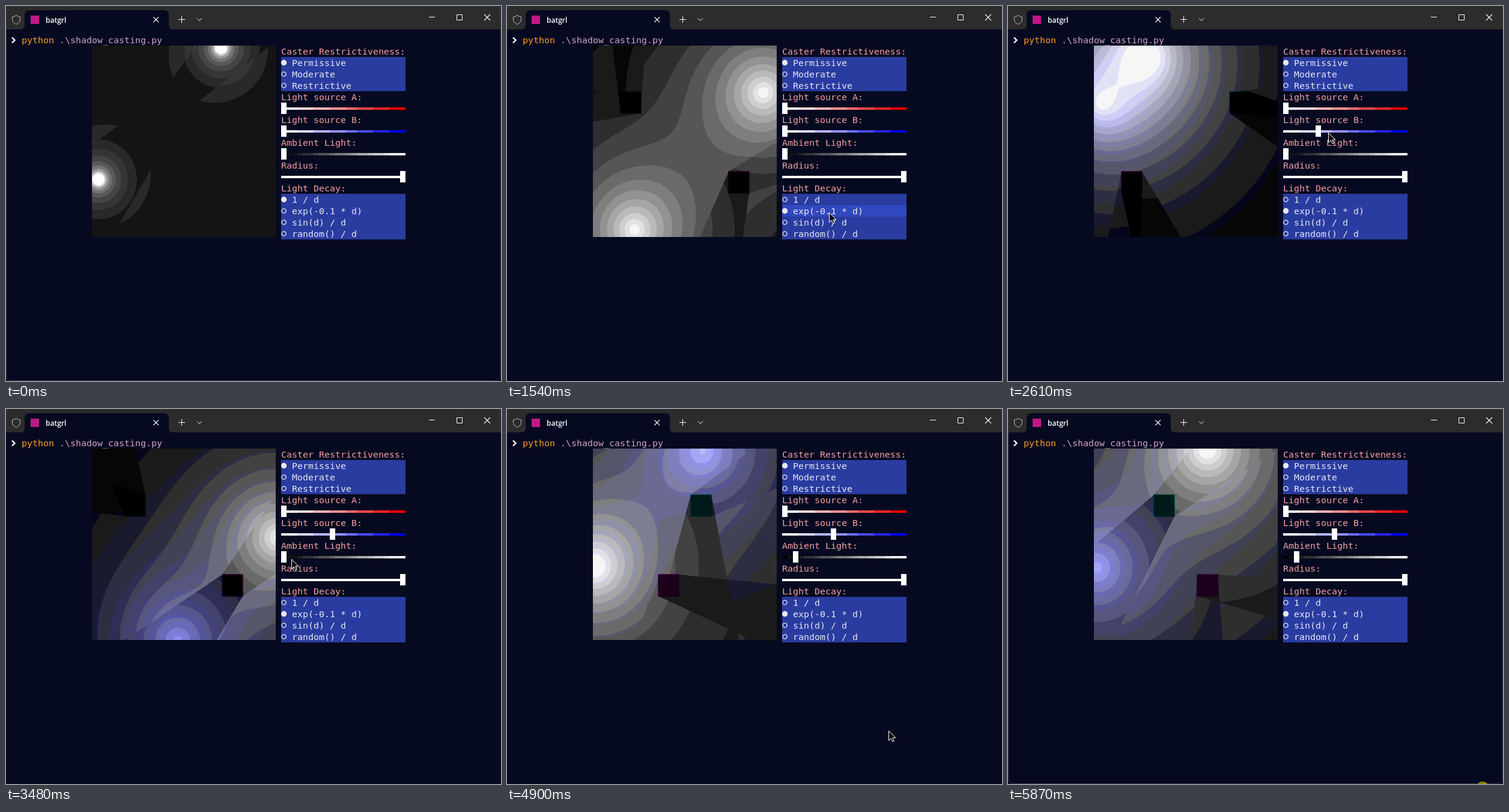
An HTML page with a canvas for the animation above (5.92 s loop, 824 by 625 pixels).

```html
<!DOCTYPE html>
<html lang="en">
<head>
<meta charset="utf-8">
<title>Shadow casting</title>
<style>
  html, body { margin: 0; width: 824px; height: 625px; overflow: hidden; background: #060a20; }
  canvas, svg { position: absolute; display: block; }
  canvas { left: 143px; top: 66px; }
  svg { left: 0; top: 0; }
  .mono { font: 14.95px "DejaVu Sans Mono", "Liberation Mono", monospace; }
  .tab { font: 600 12px "Open Sans", "Noto Sans", sans-serif; }
</style>
</head>
<body>
<canvas id="map" width="306" height="319"></canvas>
<svg id="ui" width="824" height="625" viewBox="0 0 824 625"></svg>
<script>
const LOOP = 5920, W = 306, H = 319, LEFT = 143, TOP = 66;
const CELL = 9, ROW = 19, PANEL = 458, CELLS = 23;
const BG = "#060a20", LABEL = "#f2a1a1", MENU = "#2a3ca0", HOVER = "#3248c0", ITEM = "#e6e8f2";
const ui = document.getElementById("ui");
const ctx = document.getElementById("map").getContext("2d");
const image = ctx.createImageData(W, H);

// ---------- time ----------
// Start of each run of twelve 50 ms steps; 1 marks a run whose first step lasts 70 ms.
const RUNS = [[0, 0], [50, 0], [670, 0], [1270, 1], [1890, 0], [2490, 1], [3110, 1],
              [3730, 1], [4350, 0], [4950, 1], [5570, 0]];

function snap(t) {
  const [start, long] = RUNS.filter(r => r[0] <= t).pop();
  const d = t - start, extra = long * 20;
  if (d < 50 + extra) return start;
  return start + extra + Math.min(11, Math.floor((d - extra) / 50)) * 50;
}

// Linear interpolation through rows of [time, ...values].
function track(rows, t) {
  if (t <= rows[0][0]) return rows[0].slice(1);
  for (let i = 1; i < rows.length; i++) {
    const a = rows[i - 1], b = rows[i];
    if (t < b[0]) {
      const k = (t - a[0]) / (b[0] - a[0]);
      return a.slice(1).map((v, j) => v + (b[j + 1] - v) * k);
    }
  }
  return rows[rows.length - 1].slice(1);
}

// ---------- scene ----------
// time, box travel in cells, light A x y, light B x y
const POSES = [
  [0, 8, 358, 70, 154, 289],
  [1540, 40, 212, 373, 427, 144],
  [2610, 60, 229, 82, 156, 163],
  [3480, 79, 452, 214, 286, 386],
  [4350, 96, 271, 384, 444, 203],
  [4900, 107, 145, 262, 326, 69],
  [5870, 126, 332, 68, 147, 264],
];

// The lights orbit in opposite directions, so interpolate unwrapped polar coordinates.
const TAU = Math.PI * 2, mod = (a, n) => ((a % n) + n) % n;
function polar(x, y) {
  const u = (x - LEFT) / W * 2 - 1, v = (y - TOP) / H * 2 - 1;
  return [Math.atan2(v, u), Math.hypot(u, v)];
}
function point(angle, r) {
  return [(1 + r * Math.cos(angle)) * W / 2, (1 + r * Math.sin(angle)) * H / 2];
}
const orbit = [];
for (const [t, travel, ax, ay, bx, by] of POSES) {
  const a = polar(ax, ay), b = polar(bx, by), last = orbit[orbit.length - 1];
  if (last) {
    a[0] = last[2] + mod(a[0] - last[2], TAU);
    b[0] = last[4] - mod(last[4] - b[0], TAU);
  }
  orbit.push([t, travel, ...a, ...b]);
}

function bounce(travel) {
  const p = mod(Math.round(travel), 40);
  return 5 + (p < 20 ? p : 40 - p);
}

const BOX_W = 36, BOX_H = 38;
function blocked(px, py, dx, dy, box) {
  const x1 = (box.x + 1 - px) / dx, x2 = (box.x + BOX_W - 1 - px) / dx;
  const y1 = (box.y + 1 - py) / dy, y2 = (box.y + BOX_H - 1 - py) / dy;
  const enter = Math.max(Math.min(x1, x2), Math.min(y1, y2), 0);
  const leave = Math.min(Math.max(x1, x2), Math.max(y1, y2), 1);
  return enter < leave;
}

const inverse = d => Math.min(1, 1 / d);
const exponential = d => Math.exp(-0.1 * d);

// Banding: geometric for 1 / d, even steps for exp.
function coarse(v) {
  if (v < 36) return 20;
  const n = Math.min(7, Math.floor(Math.log(v / 36) / Math.log(1.3)));
  return Math.min(255, 40.7 * 1.3 ** n);
}
const even = v => v < 1 ? 0 : Math.min(246, Math.floor(v / 20) * 20 + 6);
const table = f => Uint8ClampedArray.from({ length: 256 }, (_, v) => f(v));
const BANDS = { inverse: table(coarse), exponential: table(even) };

function drawMap(t, tint, ambient) {
  const [travel, a, ra, b, rb] = track(orbit, t);
  const col = bounce(travel);
  const boxes = [
    { x: col * CELL, y: 76, color: [0, 1, 1] },
    { x: (30 - col) * CELL, y: 209, color: [1, 0, 1] },
  ];
  const lights = [
    { at: point(a, ra), color: [1, 1, 1] },
    { at: point(b, rb), color: [1 - tint, 1 - tint, 1] },
  ];
  const early = t < EXP_AT;
  const decay = early ? inverse : exponential;
  const bands = early ? BANDS.inverse : BANDS.exponential;
  const white = [1, 1, 1], data = image.data, sum = [0, 0, 0];
  let k = 0;
  for (let y = 0; y < H; y++) for (let x = 0; x < W; x++) {
    const px = x + 0.5, py = y + 0.5;
    sum.fill(ambient);
    for (const { at, color } of lights) {
      const dx = at[0] - px, dy = at[1] - py;
      if (blocked(px, py, dx, dy, boxes[0]) || blocked(px, py, dx, dy, boxes[1])) continue;
      const power = decay(Math.hypot(dx / 9, dy / 9.38));
      for (let c = 0; c < 3; c++) sum[c] += power * color[c];
    }
    const box = boxes.find(o => px > o.x && px < o.x + BOX_W && py > o.y && py < o.y + BOX_H);
    const base = box ? box.color : white;
    for (let c = 0; c < 3; c++) data[k++] = bands[Math.min(255, Math.floor(255 * sum[c] * base[c]))];
    data[k++] = 255;
  }
  ctx.putImageData(image, 0, 0);
}

// ---------- interface ----------
function add(tag, attrs, text) {
  const el = document.createElementNS("http://www.w3.org/2000/svg", tag);
  for (const name in attrs) el.setAttribute(name, attrs[name]);
  if (text) el.textContent = text;
  return ui.appendChild(el);
}
const rect = (x, y, width, height, fill) => add("rect", { x, y, width, height, fill });
const line = (d, stroke = "#fff", width = 1) =>
  add("path", { d, stroke, fill: "none", "stroke-width": width });
const rowY = row => TOP + row * ROW;
const write = (text, x, row, fill) => add("text", { x, y: rowY(row) + 15, fill, class: "mono" }, text);

function titleBar() {
  rect(0, 0, 824, 39, "#2c2c2c");
  add("path", { d: "M24 39Q31 39 31 32V15Q31 7 39 7H263Q271 7 271 15V32Q271 39 278 39Z", fill: BG });
  line("M17 15.5Q20 18 23.5 18V22Q23.5 28 17 30.5Q10.500 28 10.500 22V18Q14 18 17 15.500Z", "#b8b8b8");
  rect(41, 16, 14, 14, "#c01888");
  add("text", { x: 66, y: 28, fill: "#fff", class: "tab" }, "batgrl");
  line("M245.500 18.500L254 27M254 18.500L245.500 27", "#fff", 1.1);
  line("M287 22.500H298M292.500 17V28");
  line("M309.500 13V32", "#333");
  line("M318 20.500L322 24.500L326 20.500");
  line("M704 18.500H714");
  line("M750.500 14.500H759.500V23.500H750.500Z");
  line("M796 14L806 24M806 14L796 24", "#fff", 1.1);
}

function prompt() {
  line("M10 52.500L14.500 57L10 61.500", "#fff", 2.4);
  write("python", 26, -1, "#ff9a28");
  write(".\\shadow_casting.py", 89, -1, "#d2a3c6");
}

function radios(row, names) {
  return names.map((name, i) => {
    const y = rowY(row + i);
    const back = rect(PANEL, y, CELLS * CELL, ROW, MENU);
    const dot = add("circle", { cx: 462.5, cy: y + 9.5, stroke: ITEM, "stroke-width": 1.4 });
    write(name, 476, row + i, ITEM);
    return { y, back, dot };
  });
}

function setRadios(list, chosen, [mx, my]) {
  list.forEach(({ y, back, dot }, i) => {
    const over = mx >= PANEL && mx < 665 && my >= y && my < y + ROW;
    back.setAttribute("fill", over ? HOVER : MENU);
    dot.setAttribute("fill", i === chosen ? ITEM : "none");
    dot.setAttribute("r", i === chosen ? 4 : 3.6);
  });
}

function slider(row, steps, shade, start = 0) {
  const y = rowY(row);
  for (let i = 0; i < steps; i++) {
    const x = Math.round(i * CELLS / steps), end = Math.round((i + 1) * CELLS / steps);
    rect(PANEL + x * CELL, y + 8, (end - x) * CELL, 4, shade(steps > 1 ? i / (steps - 1) : 0));
  }
  return rect(PANEL + start * CELL, y, CELL, ROW, "#fff");
}

const fade = k => Math.round(255 * (1 - k));
titleBar();
prompt();
write("Caster Restrictiveness:", PANEL, 0, LABEL);
const casters = radios(1, ["Permissive", "Moderate", "Restrictive"]);
write("Light source A:", PANEL, 4, LABEL);
slider(5, 8, k => `rgb(255,${fade(k)},${fade(k)})`);
write("Light source B:", PANEL, 6, LABEL);
const blueHandle = slider(7, 8, k => `rgb(${fade(k)},${fade(k)},255)`);
write("Ambient Light:", PANEL, 8, LABEL);
const ambientHandle = slider(9, 16, k => `rgb(${[1, 1, 1].map(() => 255 - fade(k))})`);
write("Radius:", PANEL, 10, LABEL);
slider(11, 1, () => "#fff", 22);
write("Light Decay:", PANEL, 12, LABEL);
const decays = radios(13, ["1 / d", "exp(-0.1 * d)", "sin(d) / d", "random() / d"]);

const frame = add("rect", { x: 0.5, y: 0.5, width: 823, height: 624, rx: 8, fill: "none", stroke: "#35373f" });
const clickMark = add("circle", { cx: 790, cy: 632, r: 11, fill: "#8c8a0c" });
const cursor = add("path", {
  d: "M0 0V16L3.800 12.500L6.300 18L8.800 17L6.400 11.500H11.500Z",
  fill: "#0a0a0a", stroke: "#fff", "stroke-width": 1,
});

// ---------- script ----------
const EXP_AT = 1150;
const MOUSE = [
  [400, 743, 593], [600, 700, 545], [950, 565, 352], [1250, 539, 346], [1540, 536, 344],
  [1840, 536, 346], [2150, 490, 240], [2350, 463, 208], [2460, 480, 209], [2610, 533, 211],
  [2800, 540, 210], [3020, 538, 212], [3250, 490, 242], [3480, 475, 250], [3700, 464, 247],
  [3950, 479, 248], [4350, 481, 249], [4500, 515, 312], [4700, 590, 470], [4900, 635, 536],
  [5200, 720, 590], [5500, 776, 624], [5600, 782, 640],
];
const BLUE = [[2400, 0], [2610, 6], [2740, 9]];
const AMBIENT = [[3730, 0], [3950, 2]];

function setHandle(handle, rows, t) {
  const cell = Math.round(track(rows, t)[0]);
  handle.setAttribute("x", PANEL + cell * CELL);
  return cell / (CELLS - 1);
}

function show(el, on) {
  el.setAttribute("visibility", on ? "visible" : "hidden");
}

function render(t) {
  const tint = setHandle(blueHandle, BLUE, t);
  const ambient = setHandle(ambientHandle, AMBIENT, t);
  const mouse = track(MOUSE, t);
  const seen = t >= 400 && t < 5570;
  const hover = seen ? mouse : [-1, -1];
  setRadios(casters, 0, hover);
  setRadios(decays, t < EXP_AT ? 0 : 1, hover);
  cursor.setAttribute("transform", `translate(${mouse.map(v => Math.round(v) + 0.5)})`);
  show(cursor, seen);
  show(clickMark, t >= 5820);
  show(frame, t < 900 || t >= 5820);
  drawMap(t, tint, ambient);
}

const began = performance.now();
let shown = -1;
function tick() {
  const t = snap((performance.now() - began) % LOOP);
  if (t !== shown) render(shown = t);
  requestAnimationFrame(tick);
}
tick();
</script>
</body>
</html>
```
